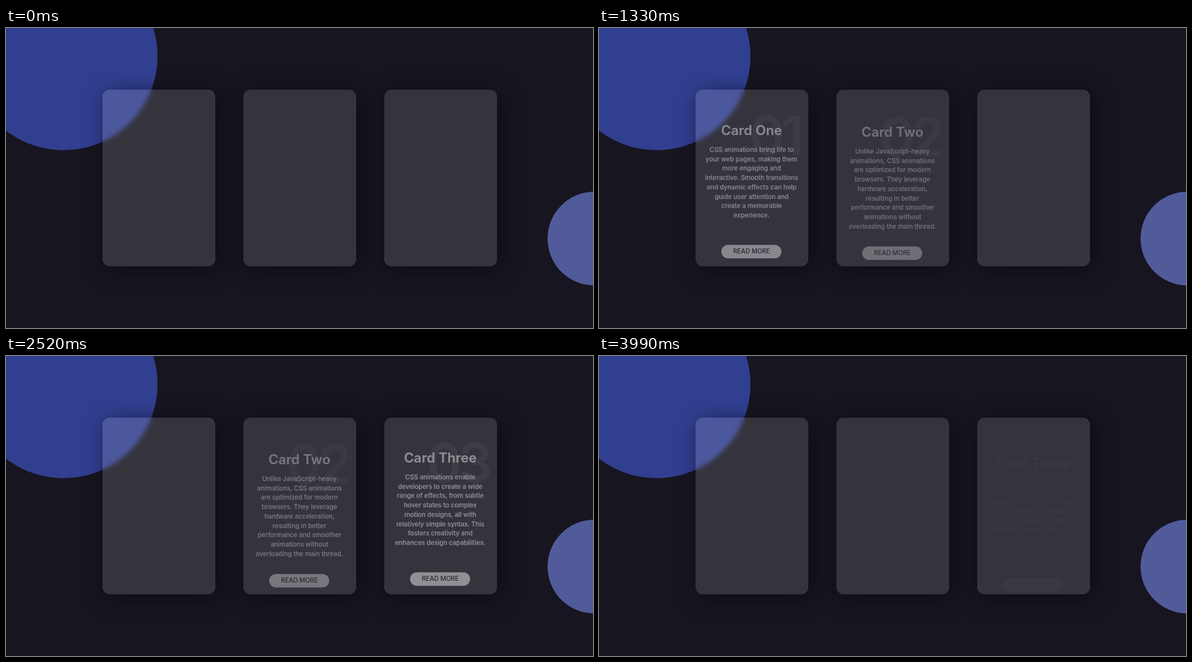
Write an HTML page that moves like this. It is 1046 px wide and 535 px high and loops after 4.69 s.

```html
<!DOCTYPE html>
<html lang="en">
<head>
<meta charset="utf-8">
<title>Glass cards</title>
<style>
  html, body { margin: 0; width: 100%; height: 100%; overflow: hidden; background: #171520; }
  body { position: relative; font-family: Inter, "Liberation Sans", sans-serif; color: #fff; --t: 0; }

  .disc { position: absolute; border-radius: 50%; }
  .big { left: -65px; top: -117px; width: 335px; height: 335px; background: #313f90; }
  .small { left: 965px; top: 292px; width: 167px; height: 167px; background: #525b99; }

  .card {
    position: absolute; left: var(--x); top: 110px; width: 201px; height: 315px;
    border-radius: 12.5px;
    background: rgba(255, 255, 255, .132);
    box-shadow: 5px 5px 36px rgba(1, 1, 14, .55);
    -webkit-backdrop-filter: blur(4.2px);
    backdrop-filter: blur(4.2px);
  }

  /* The clock moves --t; each fade is read off at that moment. */
  .content {
    position: absolute; left: -.6px; top: 0; width: 100%; height: 100%;
    text-align: center; white-space: nowrap;
    animation:
      show 500ms ease calc((var(--in) - var(--t)) * 1ms) both paused,
      hide 500ms ease calc((var(--out) - var(--t)) * 1ms) forwards paused;
  }
  @keyframes show {
    from { opacity: 0; transform: translateY(25px); }
    to { opacity: 1; transform: none; }
  }
  @keyframes hide {
    from { opacity: 1; transform: none; }
    to { opacity: 0; transform: translateY(25px); }
  }

  .content > * { position: absolute; margin: 0; }
  .num {
    right: 14.5px; top: 17.5px;
    font-size: 96px; line-height: 96px; font-weight: 600; letter-spacing: -7px;
    color: rgba(255, 255, 255, .1);
  }
  h3, p { left: 0; right: 0; -webkit-text-stroke: .2px; }
  h3 { top: 44.3px; font-size: 24px; line-height: 28px; font-weight: 600; }
  p {
    top: 83.8px;
    font-size: 11.5px; line-height: 16.75px; font-weight: 500; letter-spacing: -.06px;
  }
  .more {
    left: 47px; top: 262.4px; width: 107px; height: 23.5px; border-radius: 12px;
    background: #fff; color: #171520;
    font-size: 11.2px; line-height: 23.5px; font-weight: 500;
  }
</style>
</head>
<body>
  <div class="disc big"></div>
  <div class="disc small"></div>

  <div class="card" style="--x: 172px; --in: 320; --out: 1160">
    <div class="content">
      <span class="num">01</span>
      <h3>Card One</h3>
      <p>CSS animations bring life to<br>your web pages, making them<br>more engaging and<br>interactive. Smooth transitions<br>and dynamic effects can help<br>guide user attention and<br>create a memorable<br>experience.</p>
      <span class="more">READ MORE</span>
    </div>
  </div>

  <div class="card" style="--x: 423px; --in: 1230; --out: 2325">
    <div class="content">
      <span class="num">02</span>
      <h3>Card Two</h3>
      <p>Unlike JavaScript-heavy<br>animations, CSS animations<br>are optimized for modern<br>browsers. They leverage<br>hardware acceleration,<br>resulting in better<br>performance and smoother<br>animations without<br>overloading the main thread.</p>
      <span class="more">READ MORE</span>
    </div>
  </div>

  <div class="card" style="--x: 674px; --in: 2385; --out: 3590">
    <div class="content">
      <span class="num">03</span>
      <h3>Card Three</h3>
      <p>CSS animations enable<br>developers to create a wide<br>range of effects, from subtle<br>hover states to complex<br>motion designs, all with<br>relatively simple syntax. This<br>fosters creativity and<br>enhances design capabilities.</p>
      <span class="more">READ MORE</span>
    </div>
  </div>

<script>
  const LOOP = 4690, STEP = 70, HOLD = 3990;
  const start = performance.now();

  function tick() {
    const t = (performance.now() - start) % LOOP;
    // Motion advances in 70 ms beats and rests before the loop restarts.
    const beat = Math.min(Math.floor(t / STEP) * STEP, HOLD);
    document.body.style.setProperty('--t', beat);
    requestAnimationFrame(tick);
  }
  tick();
</script>
</body>
</html>
```
